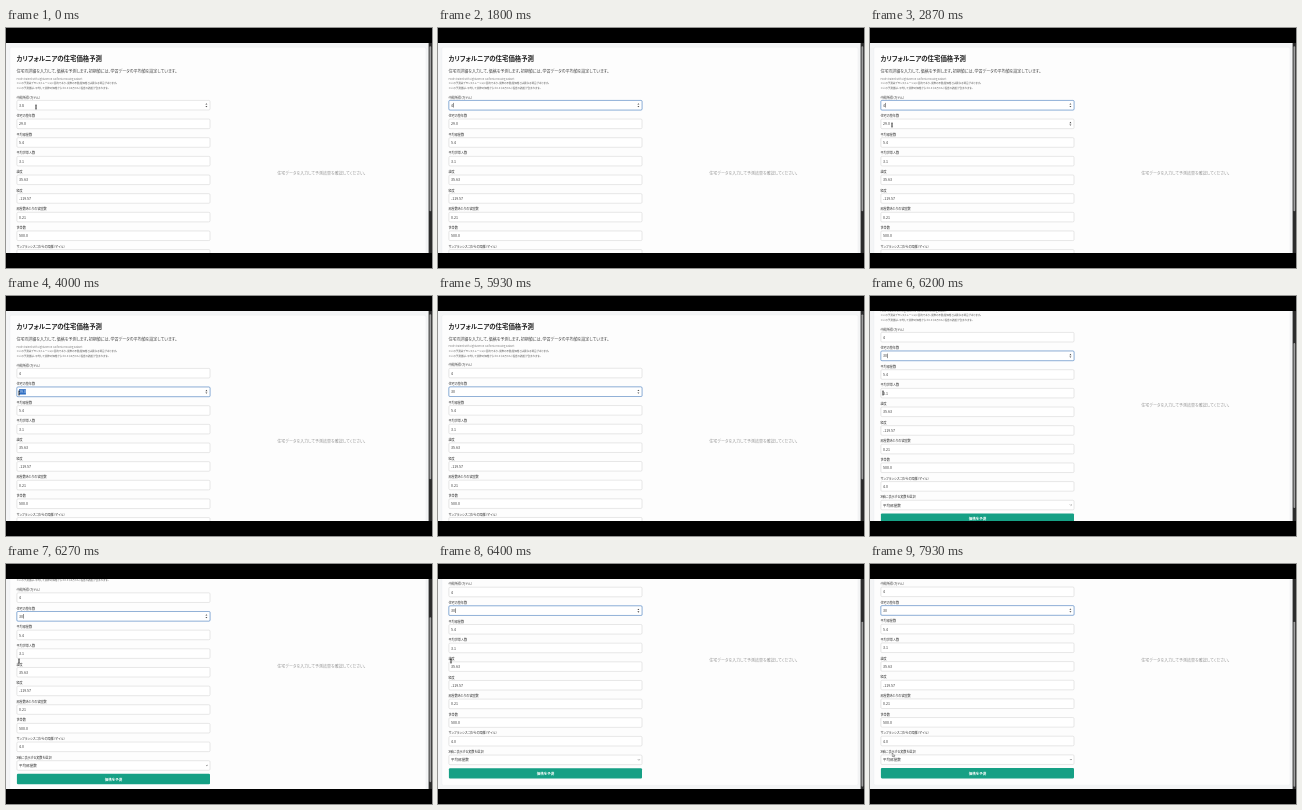
Write an HTML page that moves like this. It is 426x240 px and loops after 8 s.

```html
<!DOCTYPE html>
<html lang="ja">
<head>
<meta charset="utf-8">
<title>住宅価格予測</title>
<style>
  html, body { margin: 0; width: 100%; height: 100%; overflow: hidden; background: #000; }
  svg { display: block; width: 100vw; height: 100vh; }
  text {
    font-family: "Noto Sans CJK JP", "Noto Sans CJK", "Noto Sans", sans-serif;
    font-feature-settings: "palt";
    dominant-baseline: central;
    white-space: pre;
  }
</style>
</head>
<body>
<svg id="stage" viewBox="0 0 426 240">
  <clipPath id="view"><rect y="15" width="426" height="210"/></clipPath>
</svg>
<script>
const LOOP = 8000, FPS = 15, BLINK = 8000 / 15;
const LEFT = 10.9, WIDTH = 193.1, PITCH = 18.65, FIRST = 77.2, BOX_H = 9.6, TEXT_X = 13;
const FIELDS = [
  ['中間所得（万ドル）', '3.8'],
  ['住宅の築年数', '29.0'],
  ['平均部屋数', '5.4'],
  ['平均世帯人数', '3.1'],
  ['緯度', '35.63'],
  ['経度', '-119.57'],
  ['部屋数あたりの寝室数', '0.21'],
  ['世帯数', '500.0'],
  ['サンフランシスコからの距離（マイル）', '4.0'],
  ['X軸に表示する変数を選択', '平均部屋数']
];
const SELECT = FIELDS.length - 1;
const BUTTON_Y = 253.4;

const stage = document.getElementById('stage');

function add(parent, tag, attrs, content) {
  const node = document.createElementNS('http://www.w3.org/2000/svg', tag);
  set(node, attrs);
  if (content) node.textContent = content;
  parent.appendChild(node);
  return node;
}
function set(node, attrs) {
  for (const key in attrs) node.setAttribute(key, attrs[key]);
}
function show(node, visible) {
  node.setAttribute('visibility', visible ? 'visible' : 'hidden');
}
function label(parent, x, y, size, fill, content, weight = 400) {
  return add(parent, 'text', { x, y, 'font-size': size, fill, 'font-weight': weight }, content);
}

const view = add(stage, 'g', { 'clip-path': 'url(#view)' });
add(view, 'rect', { y: 15, width: 426, height: 210, fill: '#f4f5f6' });
const page = add(view, 'g', {});
add(page, 'rect', { x: 3.8, y: 19.2, width: 416.2, height: 251.4, rx: 1.8, fill: '#fdfdfd', stroke: '#e9eaec', 'stroke-width': .4 });

label(page, 10.5, 30.5, 6.4, '#222', 'カリフォルニアの住宅価格予測', 600);
label(page, 10.5, 43, 4, '#444', '住宅の詳細を入力して、価格を予測します。初期値には、学習データの平均値を設定しています。');
label(page, 10.5, 50.5, 2.4, '#777', 'Model trained with LightGBM on California Housing Dataset');
label(page, 10.5, 55.2, 2.55, '#555', '※この予測はデモンストレーション目的であり、実際の不動産価格とは異なる場合があります。');
label(page, 10.5, 59.7, 2.55, '#555', '※この予測値は、平均して実際の価格から±0.3（10万ドル）程度の誤差が含まれます。');
label(page, 271.3, 145.2, 4, '#9a9a9a', '住宅データを入力して予測結果を確認してください。');

const centerOf = i => FIRST + i * PITCH;

const rows = FIELDS.map(([name, value], i) => {
  const y = centerOf(i);
  label(page, 10.5, y - 8.2, 3.11, '#333', name, 500);
  const glow = add(page, 'rect', {
    x: LEFT - .5, y: y - BOX_H / 2 - .5, width: WIDTH + 1, height: BOX_H + 1, rx: 1.5, fill: '#c9dcf2'
  });
  const box = add(page, 'rect', {
    x: LEFT, y: y - BOX_H / 2, width: WIDTH, height: BOX_H, rx: 1.1, fill: '#fff', 'stroke-width': .5
  });
  const mark = add(page, 'rect', { y: y - 2.7, height: 5.4, fill: '#2f6fc4' });
  const text = label(page, TEXT_X, y + .1, 3.55, '#333', value);
  const caret = add(page, 'rect', { y: y - 2.3, width: .45, height: 4.6, fill: '#111' });
  const spinner = add(page, 'path', {
    d: `M199.4 ${y - .7}l1-1.3l1 1.3zM199.4 ${y + .7}l1 1.3l1-1.3z`, fill: '#444'
  });
  return { y, glow, box, mark, text, caret, spinner };
});
add(page, 'path', {
  d: `M200 ${centerOf(SELECT) - .5}l.9 .9l.9-.9`, fill: 'none', stroke: '#222', 'stroke-width': .45
});

const button = add(page, 'rect', { x: LEFT, y: BUTTON_Y, width: WIDTH, height: 10.4, rx: 1.1 });
set(label(page, LEFT + WIDTH / 2, BUTTON_Y + 5.2, 3.55, '#fff', '価格を予測', 700), { 'text-anchor': 'middle' });

add(view, 'rect', { x: 422.6, y: 15, width: 3.4, height: 210, fill: '#2c2c2c' });
const thumb = add(view, 'rect', { x: 423.5, width: 1.7, height: 165, rx: .8, fill: '#9f9f9f' });

const beam = add(view, 'path', {
  d: 'M-.9-2h.6q.3 0 .3.4v3.2q0 .4-.3.4h-.6M.9-2h-.6q-.3 0-.3.4v3.2q0 .4.3.4h.6',
  fill: 'none', stroke: '#111', 'stroke-width': .5
});
const arrow = add(view, 'path', {
  d: 'M0 0v3.6l.9-.8l.6 1.3l.6-.3l-.6-1.2h1.1z', fill: '#fff', stroke: '#111', 'stroke-width': .35
});

// Keys are [time, value, value, ...], joined by straight lines.
const SCROLL = [
  [5860, 0], [5933, 1.6], [6000, 6.2], [6067, 14.2], [6133, 25], [6200, 36],
  [6267, 43.6], [6333, 47.2], [6400, 49.2], [6467, 49.4]
];
const POINTER = [
  [200, 30, 79], [600, 19, 78], [730, 19, 78], [1000, 12.6, 78],
  [2267, 12.6, 78], [2733, 22, 97], [3333, 22, 97], [3660, 20.6, 97], [4000, 13, 97],
  [6733, 13, 97], [7300, 33, 205], [7400, 34, 206], [7600, 26, 188], [7733, 23, 176], [7933, 22, 195.5]
];

function track(keys, t) {
  if (t <= keys[0][0]) return keys[0].slice(1);
  const next = keys.findIndex(k => k[0] > t);
  if (next < 0) return keys[keys.length - 1].slice(1);
  const a = keys[next - 1], b = keys[next];
  const p = (t - a[0]) / (b[0] - a[0]);
  return a.slice(1).map((v, i) => v + (b[i + 1] - v) * p);
}

const between = (t, from, to) => t >= from && t < to;

function caretOn(t) {
  if (between(t, 1800, 3660)) return Math.floor((t - 1799) / BLINK) % 2 === 0;
  if (between(t, 4400, 4866)) return true;
  return t >= 4866 && Math.floor((t - 4866) / BLINK) % 2 === 0;
}

function valueAt(i, t) {
  if (i === 0 && t >= 1800) return '4';
  if (i === 1 && t >= 4866) return '30';
  if (i === 1 && t >= 4400) return '3';
  return FIELDS[i][1];
}

function selecting(i, t) {
  return i === 0 ? between(t, 730, 1800) : i === 1 && between(t, 3660, 4400);
}

function draw(t) {
  const [scroll] = track(SCROLL, t);
  const [px, py] = track(POINTER, t);
  const pageY = py + scroll;
  const focus = t < 730 ? -1 : t < 3660 ? 0 : 1;
  const pointerShown = !between(t, 1800, 2330) && !between(t, 4400, 5930);
  const canHover = pointerShown && !between(t, 5930, 6790);

  set(page, { transform: `translate(0 ${-scroll})` });
  set(thumb, { y: 18.3 + scroll * .8 });

  let overInput = false;
  rows.forEach((row, i) => {
    const focused = i === focus;
    const hovered = Math.abs(pageY - row.y) < BOX_H / 2;
    if (hovered && i !== SELECT) overInput = true;
    const value = valueAt(i, t);
    if (row.text.textContent !== value) row.text.textContent = value;
    show(row.glow, focused);
    set(row.box, { stroke: focused ? '#3f75b5' : '#cfcfcf' });
    show(row.spinner, i !== SELECT && (focused || hovered && canHover));

    const marked = selecting(i, t);
    const end = TEXT_X + (i < 2 ? row.text.getComputedTextLength() : 0);
    const start = Math.min(end, Math.max(TEXT_X - .1, px));
    show(row.mark, marked);
    if (marked) set(row.mark, { x: start, width: end - start });
    set(row.text, { fill: marked && end - start > 2 ? '#e8eef8' : '#333' });
    show(row.caret, focused && caretOn(t));
    set(row.caret, { x: end + .1 });
  });

  const overButton = canHover && between(pageY, BUTTON_Y, BUTTON_Y + 10.4);
  set(button, { fill: overButton ? '#138a72' : '#16a085' });

  const useBeam = overInput || t < 6800;
  show(beam, pointerShown && useBeam);
  show(arrow, pointerShown && !useBeam);
  set(useBeam ? beam : arrow, { transform: `translate(${px} ${py})` });
}

function tick() {
  const frame = Math.floor((performance.now() % LOOP) * FPS / 1000);
  draw(frame * 1000 / FPS);
  requestAnimationFrame(tick);
}
tick();
</script>
</body>
</html>
```
